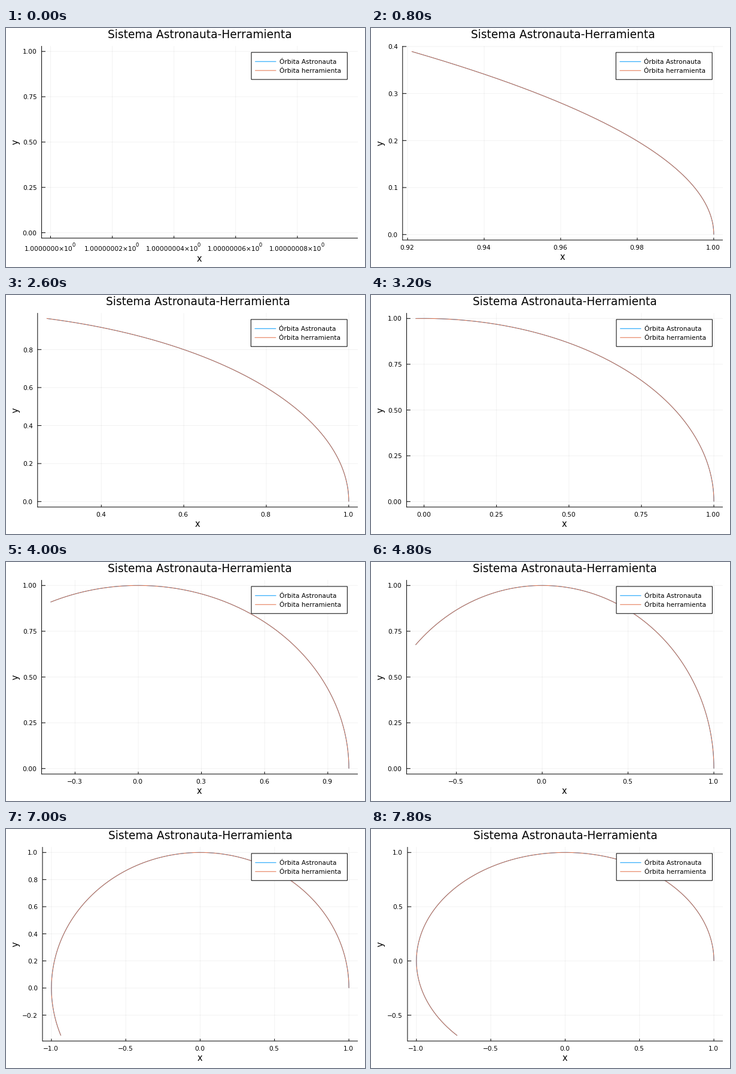
A matplotlib script that plays this animation: 600 px wide and 400 px high, repeating every 8 s.

```python
import math

import numpy as np
import matplotlib.pyplot as plt
from matplotlib.animation import FuncAnimation
from matplotlib.patches import Rectangle

plt.rcParams["font.family"] = "DejaVu Sans"
plt.rcParams["text.hinting"] = "force_autohint"

W, H, DPI = 600, 400, 100
PX = 72 / DPI                       # points per pixel
FRAMES, INTERVAL = 40, 200
STEP = 0.1                          # radians travelled per frame

RIGHT, TOP = 588, 30.1
SMALL, LABEL, TITLE = 10.667, 14.667, 18.7
BLUE, ORANGE = "#009afa", "#e36f47"
NICE = [(1, 1.0), (5, 0.9), (2, 0.7), (2.5, 0.5), (3, 0.2)]

fig = plt.figure(figsize=(W / DPI, H / DPI), dpi=DPI, facecolor="white")
ax = fig.add_axes([0, 0, 1, 1])


def nice_ticks(lo, hi):
    """Best 4 to 8 round tick values, weighing count, coverage and roundness."""
    span = hi - lo
    best, ticks = -math.inf, []
    z = math.ceil(math.log10(span))
    while 16 * 10.0 ** (z + 1) > span:
        for k in range(4, 17):
            for q, nice in NICE:
                step = q * 10.0 ** z
                reach = (k - 1) * step
                if not span <= reach < 2 * span:
                    continue
                r = math.ceil((hi - reach) / step)
                while r * step <= lo:
                    vals = [(r + i) * step for i in range(k)
                            if lo <= (r + i) * step <= hi]
                    n = len(vals)
                    if 4 <= n <= 8:
                        score = (0.25 * (1 - abs(n - 5) / 5)
                                 + (1 / 6 if r <= 0 and -r < k else 0)
                                 + 0.5 * span / ((n - 1) * step)
                                 + 0.25 * nice)
                        if score > best + 1e-9:
                            best, ticks = score, vals
                    r += 1
        z -= 1
    return ticks


def decimals(ticks):
    d = 1
    while any(abs(round(t, d) - t) > 1e-9 for t in ticks):
        d += 1
    return d


def tick_text(t, d):
    return f"{round(t, d) + 0.0:.{d}f}".replace("-", "−")


def widen(lo, hi):
    pad = 0.03 * (hi - lo)
    return lo - pad, hi + pad


def line(xs, ys, color="black", **kw):
    ax.plot(xs, ys, color=color, lw=PX, solid_capstyle="butt", snap=False, **kw)


def text(x, y, s, size=SMALL, ha="center", **kw):
    ax.text(x, y, s, fontsize=size * PX, ha=ha, va="baseline", **kw)


def power_label(x, y, s):
    """Mantissa times ten with a small raised zero, centred on x."""
    width = SMALL * (0.636 * (len(s) + 1) + 0.318 + 0.838)
    text(x - 2.9, y, s + "×10")
    text(x - 4.4 + width / 2, y - 6.8, "0", 0.8 * SMALL, ha="left")


def legend(left, bottom):
    width = RIGHT - left
    x0 = 462.9 - 0.1 * width
    x1 = RIGHT - width / 30
    y0 = TOP + (bottom - TOP) / 30
    ax.add_patch(Rectangle((x0, y0), x1 - x0, 45.3, fc="white", ec="black",
                           lw=PX, snap=False, zorder=5))
    rows = [("Órbita Astronauta", BLUE), ("Órbita herramienta", ORANGE)]
    for i, (name, color) in enumerate(rows):
        y = y0 + 15.3 + 15 * i
        line([x0 + 6.2, x0 + 6.2 + width / 15], [y, y], color, zorder=6)
        text(x0 + 46.5, y + 4.2, name, ha="left", zorder=6)


def draw(n):
    ax.clear()
    ax.set_xlim(0, W)
    ax.set_ylim(H, 0)
    ax.axis("off")

    a = np.linspace(0, n * STEP, 40 * n + 2)
    xs, ys = np.cos(a), np.sin(a)
    if n:
        xlim, ylim = widen(xs.min(), xs.max()), widen(ys.min(), ys.max())
        xticks = nice_ticks(*xlim)
        bottom = 354.9
    else:
        # a lone point: the x axis shows only the offset from 1, in 1e-8
        xlim, ylim = widen(0, 9.67), widen(0, 1)
        xticks = [0, 2, 4, 6, 8]
        bottom = 351.7
    yticks = nice_ticks(*ylim)
    xd, yd = decimals(xticks), decimals(yticks)
    left = 52.8 + 6.75 * (yd - 1) + (8.2 if yticks[0] < -1e-9 else 0)

    def to_x(v):
        return left + (v - xlim[0]) / (xlim[1] - xlim[0]) * (RIGHT - left)

    def to_y(v):
        return bottom - (v - ylim[0]) / (ylim[1] - ylim[0]) * (bottom - TOP)

    for t in xticks:
        x = to_x(t)
        line([x, x], [TOP, bottom], alpha=0.05)
        line([x, x], [bottom, bottom - 0.012 * (bottom - TOP)])
        if n:
            text(x - 0.9, bottom + 16.1, tick_text(t, xd))
        else:
            power_label(x, bottom + 21, f"1.0000000{t or ''}")
    for t in yticks:
        y = to_y(t)
        line([left, RIGHT], [y, y], alpha=0.05)
        line([left, left + 0.012 * (RIGHT - left)], [y, y])
        text(left - 8, y + 4.2, tick_text(t, yd), ha="right")
    line([left, left], [TOP, bottom + 0.5])
    line([left, RIGHT], [bottom, bottom])

    if n:
        for color in (BLUE, ORANGE):
            line(to_x(xs), to_y(ys), color, zorder=3)

    mid = (left + RIGHT) / 2
    text(mid + 0.4, 16.9, "Sistema Astronauta-Herramienta", TITLE)
    text(mid - 0.5, 388.3 if n else 390.7, "x", LABEL)
    text(21, (TOP + bottom) / 2, "y", LABEL, rotation=90,
         rotation_mode="anchor")
    legend(left, bottom)
    return []


anim = FuncAnimation(fig, draw, frames=FRAMES, interval=INTERVAL,
                     init_func=lambda: draw(0), repeat=True, repeat_delay=0)
plt.show()
```
